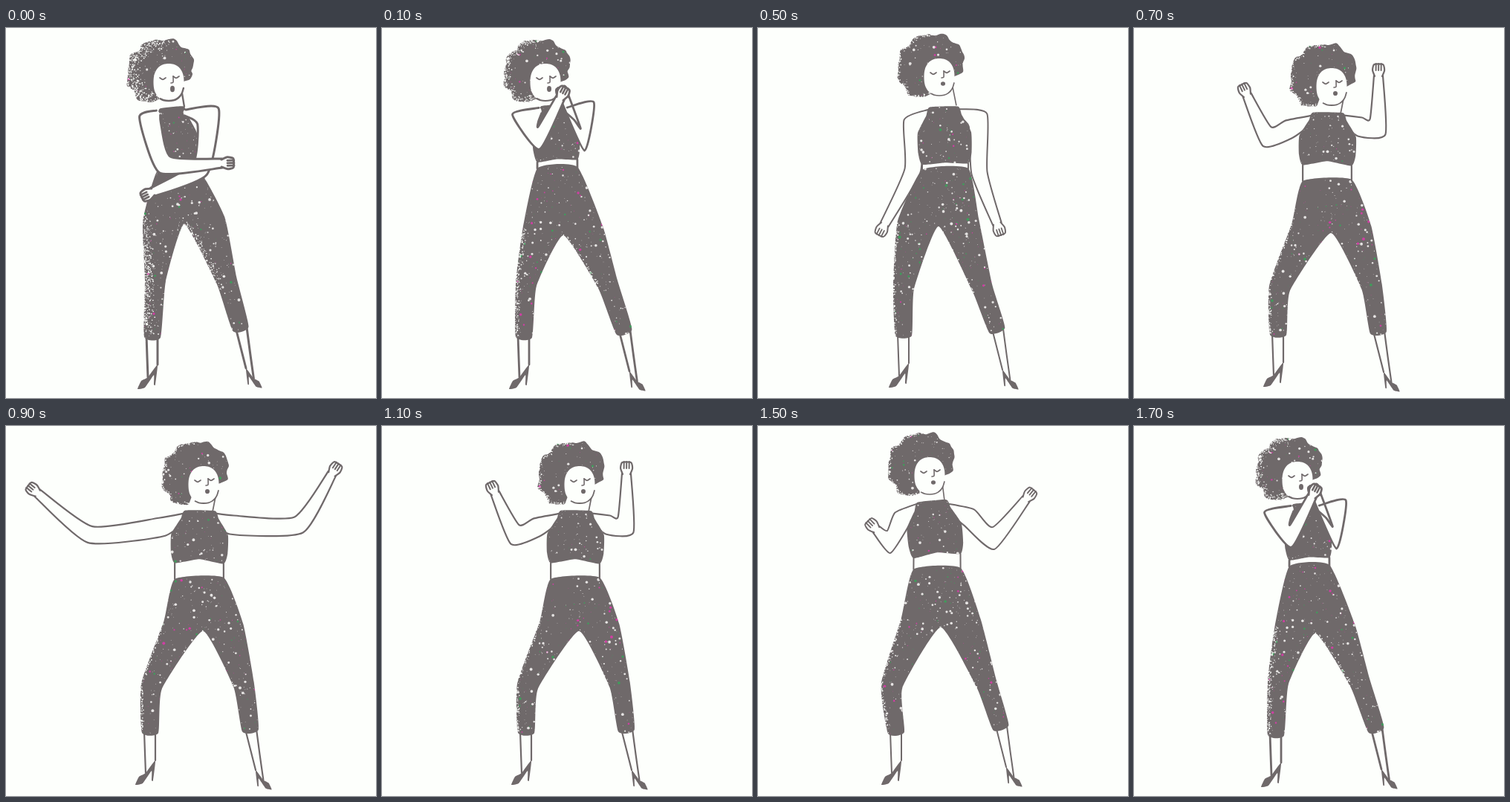
Recreate the animation shown at these times as an HTML page with a canvas. Size 498x498 px, loop 1800 ms.

```html
<!DOCTYPE html>
<html lang="en">
<head>
<meta charset="utf-8">
<title>Dancer</title>
<style>
html, body { margin: 0; width: 100%; height: 100%; overflow: hidden; background: #fdfffc; }
canvas { display: block; }
</style>
</head>
<body>
<canvas id="stage" width="498" height="498"></canvas>
<script>
const PAPER = '#fdfffc', INK = '#6f696a', PINK = '#cf3fa3', GREEN = '#3f9d5b', GLITTER = '#e6e4e3';
const SIZE = 498, STEP = 100, LAST = 9;
const ctx = document.getElementById('stage').getContext('2d');

// Key poses by joint. Arms list shoulder, elbow and wrist; `at` is the step where the pose is held.
const KEYS = [
  { at: 0, head: [219, 73], neck: [223, 107], waist: [231, 188], crotch: [240, 264],
    knees: [[201, 340], [297, 340]], cuffs: [[197, 416], [316, 405]],
    arms: [[[194, 124], [214, 184], [291, 182]], [[272, 119], [261, 190], [197, 221]]],
    midriff: 0, build: .84, dust: 14, line: 3 },
  { at: 1, head: [220, 73], neck: [231, 104], waist: [236, 187], crotch: [244, 279],
    knees: [[194, 345], [304, 345]], cuffs: [[191, 416], [326, 409]],
    arms: [[[193, 121], [211, 148], [240, 94]], [[272, 112], [270, 150], [246, 94]]],
    midriff: 8, build: .87, dust: 7, line: 2.8 },
  { at: 3, head: [231, 67], neck: [234, 101], waist: [241, 191], crotch: [246, 271],
    knees: [[180, 350], [308, 348]], cuffs: [[186, 413], [327, 406]],
    arms: [[[194, 125], [176, 156], [159, 139]], [[284, 123], [317, 151], [361, 98]]],
    midriff: 16, build: 1.02, dust: 3, line: 2 },
  { at: 5, head: [244, 66], neck: [250, 106], waist: [252, 189], crotch: [243, 267],
    knees: [[196, 350], [302, 350]], cuffs: [[196, 414], [322, 407]],
    arms: [[[209, 130], [208, 192], [170, 265]], [[296, 124], [298, 195], [322, 264]]],
    midriff: 6, build: 1, dust: 3, line: 2 },
  { at: 7, head: [266, 79], neck: [261, 114], waist: [260, 204], crotch: [265, 276],
    knees: [[196, 350], [320, 348]], cuffs: [[194, 413], [329, 410]],
    arms: [[[209, 136], [179, 146], [152, 90]], [[304, 133], [328, 133], [329, 64]]],
    midriff: 19, build: 1.06, dust: 3, line: 2.2 }
];

function lerp(a, b, t) {
  if (typeof a === 'number') return a + (b - a) * t;
  if (Array.isArray(a)) return a.map((v, i) => lerp(v, b[i], t));
  return Object.fromEntries(Object.keys(a).map(key => [key, lerp(a[key], b[key], t)]));
}

const add = ([x, y], dx, dy) => [x + dx, y + dy];

// Between the held poses the arms swing out; past the last one they stretch wide.
function poseAt(index) {
  const next = KEYS.findIndex(key => key.at >= index);
  const end = KEYS[next] || KEYS[KEYS.length - 1], start = KEYS[next - 1] || end;
  const pose = lerp(start, end, start === end ? 0 : (index - start.at) / (end.at - start.at));
  const stretch = Math.max(0, index - end.at) * 55;
  const reach = stretch || (index > 3 && index < end.at ? 45 : 0);
  pose.arms = pose.arms.map(([shoulder, elbow, wrist], i) => {
    const out = i ? reach : -reach;
    return [shoulder, add(elbow, out * .6, 0), add(wrist, out, 0)];
  });
  return pose;
}

let seed = 1;
function random() {
  seed = (seed * 16807) % 2147483647;
  return seed / 2147483647;
}
const spread = size => (random() + random() - 1) * size;

function curve(pts, bend = .1, closed = true) {
  const path = new Path2D(), n = pts.length;
  const at = i => closed ? pts[(i + n) % n] : pts[Math.max(0, Math.min(n - 1, i))];
  path.moveTo(...pts[0]);
  for (let i = 0; i < (closed ? n : n - 1); i++) {
    const [a, b, c, d] = [at(i - 1), at(i), at(i + 1), at(i + 2)];
    path.bezierCurveTo(
      b[0] + (c[0] - a[0]) * bend, b[1] + (c[1] - a[1]) * bend,
      c[0] - (d[0] - b[0]) * bend, c[1] - (d[1] - b[1]) * bend, c[0], c[1]);
  }
  if (closed) path.closePath();
  return path;
}

// Both edges of a band that follows a centre line with varying half widths.
function ribbon(centres, halves) {
  const last = centres.length - 1;
  const heading = i => {
    const a = centres[Math.max(0, Math.min(last - 1, i))];
    const b = centres[Math.max(1, Math.min(last, i + 1))];
    return Math.atan2(b[1] - a[1], b[0] - a[0]);
  };
  const edge = side => centres.map((point, i) => {
    const before = heading(i - 1), after = heading(i);
    const half = Math.atan2(Math.sin(after - before), Math.cos(after - before)) / 2;
    const width = side * halves[i] * Math.min(1.45, 1 / Math.cos(half));
    const normal = before + half + Math.PI / 2;
    return add(point, Math.cos(normal) * width, Math.sin(normal) * width);
  });
  return [edge(1), edge(-1)];
}

function fill(pts, color = INK, bend) {
  ctx.fillStyle = color;
  ctx.fill(curve(pts, bend));
}

function stroke(pts, width, bend) {
  ctx.lineWidth = width;
  ctx.stroke(curve(pts, bend, false));
}

function dot([x, y], r, color) {
  ctx.fillStyle = color;
  ctx.beginPath();
  ctx.arc(x, y, r, 0, 7);
  ctx.fill();
}

// Crumbs scattered along a line give a chalky edge.
function grain(pts, size, density, color) {
  pts.slice(1).forEach((end, i) => {
    const start = pts[i], count = Math.hypot(end[0] - start[0], end[1] - start[1]) * density;
    for (let k = 0; k < count; k++) {
      dot(add(lerp(start, end, random()), spread(size), spread(size)), .3 + random() * .6, color);
    }
  });
}

function cloth(pts, bend, density = .016) {
  fill(pts, INK, bend);
  const xs = pts.map(p => p[0]), ys = pts.map(p => p[1]);
  const low = [Math.min(...xs), Math.min(...ys)], high = [Math.max(...xs), Math.max(...ys)];
  const count = (high[0] - low[0]) * (high[1] - low[1]) * density;
  ctx.save();
  ctx.clip(curve(pts, bend));
  for (let i = 0; i < count; i++) {
    const tone = random();
    const color = tone < .14 ? PINK : tone < .26 ? GREEN : GLITTER;
    dot([lerp(low[0], high[0], random()), lerp(low[1], high[1], random())],
      .4 + 1.6 * random() ** 5, color);
  }
  ctx.restore();
}

function ring(count, pointAt) {
  return Array.from({ length: count }, (_, i) => pointAt(i / count * 2 * Math.PI));
}

function drawHair({ head, dust }) {
  const centre = add(head, -9, -11);
  const phase = random() * 6;
  const outline = ring(60, angle => {
    const cut = .45 * Math.max(0, Math.cos(angle - .95)) ** 2;
    const curl = 1.6 * Math.sin(angle * 9 + phase) + 1.2 * Math.sin(angle * 14) + spread(1.2);
    const r = 47 * (1 - cut) + curl;
    return add(centre, Math.cos(angle) * r, Math.sin(angle) * r);
  });
  cloth(outline, .16, .012);
  grain(outline.slice(14, 46), dust * 1.3, dust * .5, PAPER);
}

function drawHead({ head, neck, line }) {
  const [left, right] = ribbon([add(head, 2, 10), neck], [15, 17]);
  fill([...left, ...right.reverse()], PAPER, 0);
  stroke(right, line * .8);
  const face = ring(24, angle => {
    const squared = v => Math.sign(v) * Math.abs(v) ** .85;
    return add(head, 20.5 * squared(Math.cos(angle)), 25 * squared(Math.sin(angle)));
  });
  fill(face, PAPER, .16);
  stroke(face.slice(1, 9), line * .8, .16);

  for (const side of [-1, 1]) {
    const [x, y] = add(head, 1 + side * 9, -6 - side);
    stroke([[x - 4, y - 1], [x, y + 1.3], [x + 4, y - 1]], 1.7, .16);
  }
  stroke([add(head, 6, -8), add(head, 6, 0), add(head, 3, 1)], 1.6);
  ctx.fillStyle = INK;
  ctx.beginPath();
  ctx.ellipse(head[0] + 5, head[1] + 9, 3, line * 1.4, 0, 0, 7);
  ctx.fill();
}

function drawHand([, elbow, wrist], line) {
  ctx.save();
  ctx.translate(...wrist);
  ctx.rotate(Math.atan2(wrist[1] - elbow[1], wrist[0] - elbow[0]));
  const [upper, lower] = ribbon([[-1, 0], [7, 0], [15, 0]], [5, 8, 6]);
  const fist = [...upper, ...lower.reverse()];
  fill(fist, PAPER);
  stroke(fist, line);
  for (const y of [-3.5, 0, 3.5]) stroke([[7, y], [16, y]], line * .9);
  ctx.restore();
}

function drawArms({ arms, neck, line }) {
  [1, 0].forEach(i => {
    const root = add(neck, i ? 18 : -18, 7);
    const [upper, lower] = ribbon([root, ...arms[i]], [4, 12.5, 10.5, 6]);
    fill([...upper, ...lower.slice().reverse()], PAPER);
    stroke(upper, line);
    stroke(lower, line);
    drawHand(arms[i], line);
  });
}

// One court shoe serves both feet, mirrored and turned forward for the right one.
function drawFoot(cuff, drop, side, scale, line) {
  const heel = add(cuff, 7, drop);
  const at = (x, y) => add(heel, x * side * scale, y * scale);
  const instep = at(-13, 17);
  stroke([add(cuff, -side * 8, -2), lerp(add(cuff, -side * 8, 0), instep, .5), instep], line);
  stroke([add(cuff, side * 7, -2), heel], line);
  fill([heel, at(-3, 27), at(-5, 27), at(-5, 14), at(-17, 31), at(-27, 33), at(-22, 22), instep], INK, .06);
}

function drawPants({ waist, crotch, knees, cuffs, build, dust }) {
  const leg = side => ribbon(
    [add(crotch, side ? 28 : -28, 0), knees[side], cuffs[side]], [28, 14, 11]);
  const [outerLeft, innerLeft] = leg(0), [innerRight, outerRight] = leg(1);
  const half = 31 * build;
  cloth([
    add(waist, -half, 2), ...outerLeft, ...innerLeft.slice(1).reverse(), crotch,
    ...innerRight.slice(1), ...outerRight.reverse(), add(waist, half, 0)
  ], .08);
  grain(outerLeft, dust, dust * .35, PAPER);
  grain([crotch, innerRight[1]], dust, dust * .25, PAPER);
}

function drawTop({ neck, waist, midriff, build, line }) {
  const hem = add(waist, 0, -midriff);
  const centres = [0, .15, .45, .8, 1].map(t => lerp(neck, hem, t));
  const [left, right] = ribbon(centres, [19, 24, 36, 36, 31].map(v => v * build));
  for (const [edge, side] of [[left, -1], [right, 1]]) {
    stroke([edge[4], add(waist, side * 31 * build, 2)], line);
  }
  cloth([...left, add(hem, 0, -midriff * .3), ...right.reverse()], .08);
}

function drawPose(index) {
  const pose = poseAt(index), armsInFront = index < 2;
  seed = 7411 + index * 977;
  ctx.fillStyle = PAPER;
  ctx.fillRect(0, 0, SIZE, SIZE);
  ctx.strokeStyle = INK;
  ctx.lineCap = ctx.lineJoin = 'round';

  drawHair(pose);
  drawFoot(pose.cuffs[0], 37, 1, 1, pose.line);
  drawFoot(pose.cuffs[1], 53, -1, .8, pose.line);
  if (!armsInFront) drawArms(pose);
  drawPants(pose);
  drawHead(pose);
  drawTop(pose);
  if (armsInFront) drawArms(pose);
}

let shown = -1;
function tick() {
  const step = Math.floor(performance.now() / STEP) % (LAST * 2);
  const index = LAST - Math.abs(LAST - step);
  if (index !== shown) drawPose(shown = index);
  requestAnimationFrame(tick);
}
tick();
</script>
</body>
</html>
```
